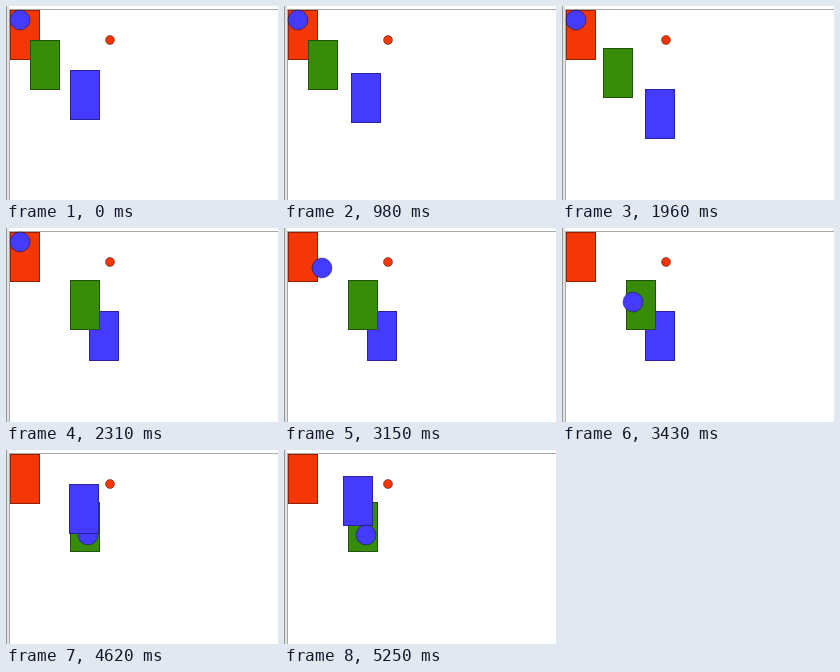
An HTML page with a canvas that plays this animation: 272x194 px, repeating every 5.53 s.

```html
<!DOCTYPE html>
<html lang="en">
<head>
<meta charset="utf-8">
<title>Dragging shapes</title>
<style>
html, body { margin: 0; width: 100%; height: 100%; overflow: hidden; background: #fff; }
canvas { display: block; }
</style>
</head>
<body>
<canvas id="stage" width="272" height="194"></canvas>
<script>
const ctx = document.getElementById('stage').getContext('2d');
const LOOP = 5530, TICK = 70;
const RED = '#f53707', GREEN = '#378c0a', BLUE = '#453bff';
const OUTLINE = 'rgba(0, 0, 0, 0.4)';

const smooth = p => p * p * (3 - 2 * p);
const easeOut = power => p => 1 - (1 - p) ** power;

// Moves from one point to another between two times, snapped to whole pixels.
function drag(t, start, end, from, to, ease) {
  const p = Math.min(1, Math.max(0, (t - start) / (end - start)));
  return from.map((v, i) => Math.round(v + (to[i] - v) * ease(p)));
}

const greenAt = t => drag(t, 1890, 2310, [24, 34], [64, 52], easeOut(3));
const ballAt = t => drag(t, 3010, 3710, [14, 14], [82, 85], easeOut(2));

function blueAt(t) {
  const dropped = drag(t, 910, 1190, [64, 64], [83, 83], smooth);
  const lifted = drag(t, 4340, 4410, dropped, [83, 77], smooth);
  return drag(t, 4410, 4760, lifted, [59, 26], easeOut(2));
}

function box([x, y], fill) {
  ctx.fillStyle = fill;
  ctx.fillRect(x, y, 30, 50);
  ctx.strokeRect(x + 0.5, y + 0.5, 29, 49);
}

function disc([x, y], r, fill) {
  ctx.beginPath();
  ctx.arc(x, y, r, 0, Math.PI * 2);
  ctx.fillStyle = fill;
  ctx.fill();
  ctx.stroke();
}

function bar(x, y, w, h, color) {
  ctx.fillStyle = color;
  ctx.fillRect(x, y, w, h);
}

function windowEdge() {
  bar(0, 0, 272, 194, '#fff');
  bar(0, 0, 1, 194, '#999');
  bar(1, 0, 2, 194, '#e2e2e2');
  bar(3, 3, 1, 191, '#aaa');
  bar(3, 3, 269, 1, '#aaa');
}

function draw(t) {
  const green = () => box(greenAt(t), GREEN);
  const blue = () => box(blueAt(t), BLUE);
  const ball = () => disc(ballAt(t), 10, BLUE);

  // A clicked shape comes to the front.
  let order = [blue, green, ball];
  if (t >= 4200) order = [green, ball, blue];
  if (t >= 5250) order = [green, blue, ball];

  windowEdge();
  ctx.strokeStyle = OUTLINE;
  box([4, 4], RED);
  disc([104, 34], 4.5, RED);
  order.forEach(paint => paint());
}

const start = performance.now();

function play() {
  const elapsed = (performance.now() - start) % LOOP;
  draw(Math.floor(elapsed / TICK) * TICK);
  requestAnimationFrame(play);
}

play();
</script>
</body>
</html>
```
